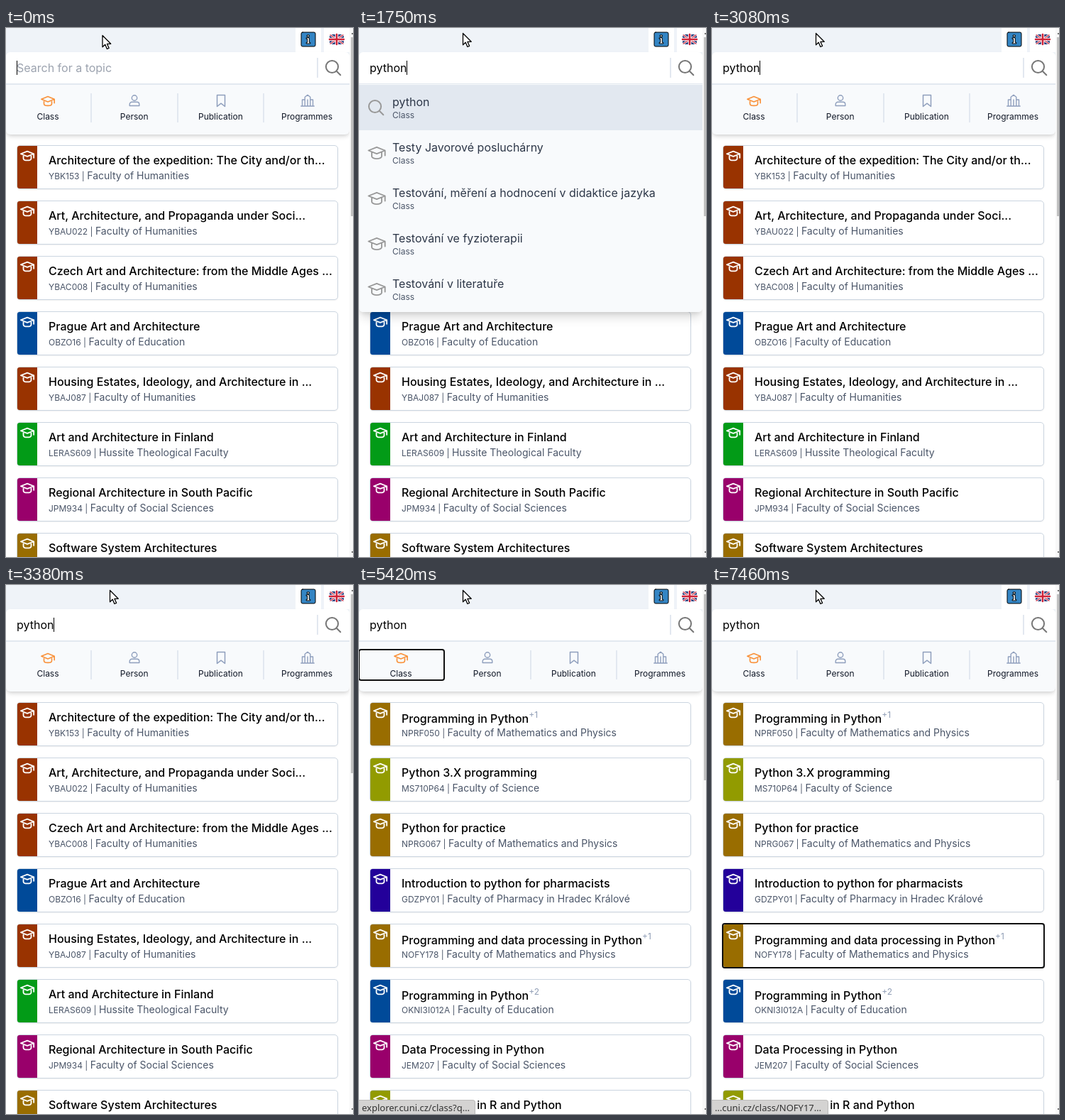
Write an HTML page that moves like this. It is 489 px wide and 745 px high and loops after 8000 ms.

```html
<!DOCTYPE html>
<html lang="en">
<head>
<meta charset="utf-8">
<title>Course search</title>
<style>
html, body { margin: 0; width: 100%; height: 100%; overflow: hidden; background: #fff; }
body { font-family: Inter, "Liberation Sans", sans-serif; }
#stage { position: relative; width: 489px; height: 745px; overflow: hidden; background: #fff; }
#stage div, #stage svg { position: absolute; box-sizing: border-box; white-space: pre; }
svg { fill: none; stroke: currentColor; stroke-linecap: round; stroke-linejoin: round; overflow: visible; }

.top { left: 0; top: 0; width: 484px; height: 50px; background: #eff3f8; }
.chip { top: 0; width: 36px; height: 34px; background: #fff; }
.head { left: 0; top: 34px; width: 484px; height: 116px; background: #f8fafc; border-radius: 6px;
  box-shadow: 0 4px 6px -1px rgba(0,0,0,.12), 0 2px 4px -1px rgba(0,0,0,.08); }
.field { left: 0; top: 0; width: 484px; height: 46px; background: #fff; border-bottom: 2px solid #e2e8f0; border-radius: 6px 6px 0 0; }
.bar { width: 2px; background: #e2e8f0; }
#query { left: 15px; top: 44px; line-height: 24px; font-size: 16px; }
#caret { top: 46px; width: 1px; height: 20px; background: #000; }
.tab { top: 117px; width: 122px; line-height: 16px; font-size: 12px; text-align: center; color: #111827; }

.card { left: 15px; width: 453px; height: 62px; background: #fff; border: 1px solid #cbd5e0; border-radius: 5px;
  box-shadow: 0 1px 2px rgba(0,0,0,.06); }
.strip { left: 0; top: 0; width: 28px; height: 60px; border-radius: 3px 0 0 3px; }
.strip svg { left: 3px; top: 3px; color: #fff; }
.name { left: 44px; top: 8px; line-height: 24px; font-size: 16px; font-weight: 500; color: #000; }
.name.up { top: 10px; }
.name span { position: relative; top: -7px; font-size: 12px; font-weight: 400; color: #8f9db5; }
.info { left: 44px; top: 32px; line-height: 20px; font-size: 14px; color: #4a5568; }
.info small { font-size: 12px; }

#menu { left: 0; top: 79px; width: 484px; height: 321px; background: #f8fafc; border-radius: 0 0 6px 6px; overflow: hidden; }
#menuBox { left: 0; top: 79px; width: 484px; height: 321px; border-radius: 0 0 6px 6px;
  box-shadow: 0 10px 15px -3px rgba(0,0,0,.14), 0 4px 6px -2px rgba(0,0,0,.1); }
.row { left: 0; width: 484px; height: 64px; }
.row:first-child { background: #e2e8f0; }
.row svg { color: #999; }
.hit { left: 47px; top: 12px; line-height: 24px; font-size: 16px; color: #2d3748; }
.kind { left: 47px; top: 35px; line-height: 16px; font-size: 12px; color: #4a5568; }

#ring { border: 2px solid #101010; border-radius: 4px; }
#status { left: 0; top: 725px; width: 164px; height: 21px; padding-left: 4px; background: #d4d3d2; border: solid #bcbbba;
  border-width: 1px 1px 0 0; border-radius: 0 4px 0 0; color: #333; font: 13px/21px "Noto Sans", sans-serif; }
.track { left: 484px; top: 0; width: 5px; height: 745px; background: #f8f8f8; }
#thumb { left: 486px; top: 13px; width: 3px; background: #c1c1c1; }
.nub { left: 487px; width: 2px; height: 2px; background: #777; }
</style>
</head>
<body>
<div id="stage"></div>
<script>
const LOOP = 8000;
const RUST = "#993300", BLUE = "#004a99", GREEN = "#029b17", PLUM = "#99006b",
      GOLD = "#996d00", OLIVE = "#929b00", INDIGO = "#23009a";
const HUM = "Faculty of Humanities", EDU = "Faculty of Education",
      SOC = "Faculty of Social Sciences", MATH = "Faculty of Mathematics and Physics";

// colour, title, code, faculty, extra count
const lists = [[
  [RUST, "Architecture of the expedition: The City and/or th...", "YBK153", HUM],
  [RUST, "Art, Architecture, and Propaganda under Soci...", "YBAU022", HUM],
  [RUST, "Czech Art and Architecture: from the Middle Ages ...", "YBAC008", HUM],
  [BLUE, "Prague Art and Architecture", "OBZO16", EDU],
  [RUST, "Housing Estates, Ideology, and Architecture in ...", "YBAJ087", HUM],
  [GREEN, "Art and Architecture in Finland", "LERAS609", "Hussite Theological Faculty"],
  [PLUM, "Regional Architecture in South Pacific", "JPM934", SOC],
  [GOLD, "Software System Architectures", "", ""]
], [
  [GOLD, "Programming in Python", "NPRF050", MATH, "+1"],
  [OLIVE, "Python 3.X programming", "MS710P64", "Faculty of Science"],
  [GOLD, "Python for practice", "NPRG067", MATH],
  [INDIGO, "Introduction to python for pharmacists", "GDZPY01", "Faculty of Pharmacy in Hradec Králové"],
  [GOLD, "Programming and data processing in Python", "NOFY178", MATH, "+1"],
  [BLUE, "Programming in Python", "OKNI3I012A", EDU, "+2"],
  [PLUM, "Data Processing in Python", "JEM207", SOC],
  [OLIVE, "Data analysis in R and Python", "", ""]
]];

const hits = [
  ["python", "Testy Javorové posluchárny", "Testování, měření a hodnocení v didaktice jazyka",
   "Testování ve fyzioterapii", "Testování v literatuře"],
  ["python", "Programování v Pythonu", "Úvod do programování v jazyce Python pro farmaceuty",
   "Zpracování dat v jazyce Python", "Analýza dat v R a Pythonu"]
];

const tabRing = i => [[-1, 90, 122, 45], [120, 90, 122, 45], [241, 90, 123, 45], [362, 90, 122, 45]][i];
const cardRing = i => [14, 164 + 78 * i, 455, 64];
const link = code => "…cuni.cz/class/" + code + "…";

// step tables: [start ms, value]
const tracks = {
  pointer: [[0, [136, 10.5]], [40, [138, 10]], [110, [141, 9]], [180, [144, 8]], [250, [146.5, 7.5]]],
  caret: [[0, 1], [420, 0], [1000, 1], [2420, 0], [3000, 1], [3750, 0], [4210, 1], [4630, 0]],
  query: [[0, ""], [1750, "python"]],
  menu: [[0, -1], [1750, 0], [2460, 1], [3080, -1]],
  list: [[0, 0], [3710, 1]],
  ring: [[0, null], [4630, [444, 40, 34, 32]], [5420, tabRing(0)], [5580, tabRing(1)], [5880, tabRing(2)],
    [6290, tabRing(3)], [6540, cardRing(0)], [7000, cardRing(1)], [7170, cardRing(2)],
    [7290, cardRing(3)], [7460, cardRing(4)]],
  status: [[0, ""], [4790, "explorer.cuni.cz/class?q…"], [5580, "explorer.cuni.cz/person?…"],
    [5920, "explorer.cuni.cz/publicat…"], [6290, "…cuni.cz/programme?q…"], [6580, link("NPRF05")],
    [7000, link("MS710P")], [7170, link("NPRG06")], [7290, link("GDZPY0")], [7460, link("NOFY17")]],
  statusFade: [[0, 0], [4790, 0.5], [4960, 1]]
};

const svg = (x, y, w, box, body, width, color = "") =>
  `<svg style="left:${x}px;top:${y}px${color && ";color:" + color}" width="${w}" height="${w}" viewBox="0 0 ${box} ${box}" stroke-width="${width}">${body}</svg>`;
const cap = (x, y, w, width, color) =>
  svg(x, y, w, 24, '<path d="M22 9L12 5 2 9l10 4 10-4v6M6 10.6V16a6 3 0 0 0 12 0v-5.4"/>', width, color);
const lens = (x, y, color) =>
  svg(x, y, 24, 24, '<circle cx="10.5" cy="10.5" r="8.6"/><path d="M16.8 16.8L22.3 22.3"/>', 2, color);
const bar = (x, y, h) => `<div class="bar" style="left:${x}px;top:${y}px;height:${h}px"></div>`;

const card = ([color, name, code, faculty, extra], i) =>
  `<div class="card" style="top:${165 + 78 * i}px"><div class="strip" style="background:${color}">${cap(3, 3, 22, 2)}</div>` +
  `<div class="name${extra ? " up" : ""}">${name}${extra ? `<span>${extra}</span>` : ""}</div>` +
  `<div class="info"><small>${code} | </small>${faculty}</div></div>`;
const row = (name, i) =>
  `<div class="row" style="top:${1 + 64 * i}px">${i ? cap(11, 18, 28, 1.6) : lens(12, 20)}` +
  `<div class="hit">${name}</div><div class="kind">Class</div></div>`;

const GREY = "#8f9fbd";
const person = '<circle cx="10" cy="5.5" r="3.7"/><path d="M3.2 16.5v-2a3.2 3.2 0 0 1 3.2-3.2h7.2a3.2 3.2 0 0 1 3.2 3.2v2z"/>';
const bookmark = '<path d="M4.5 1.5h11v16L10 13.2l-5.500 4.300z"/>';
const hall = '<path d="M.8 17h18.400M6.200 17V4.200L10 1.200l3.800 3V17M2.500 17V8h3.700M13.800 8h3.700v9M10 8v9"/>';
const flag = `<svg style="left:456px;top:9px" width="20" height="14" viewBox="0 0 20 14" stroke-linecap="butt">
  <rect width="20" height="14" rx="1.5" fill="#223b7c" stroke="none"/>
  <path d="M1 .7L19 13.300M19 .7L1 13.300" stroke="#fff" stroke-width="2.800"/>
  <path d="M1 .7L19 13.300M19 .7L1 13.300" stroke="#cf2338" stroke-width="1.100"/>
  <path d="M10 0v14M0 7h20" stroke="#fff" stroke-width="4.600"/>
  <path d="M10 0v14M0 7h20" stroke="#cf2338" stroke-width="2.600"/></svg>`;
const infoBadge = `<svg style="left:416px;top:6px" width="20" height="20" stroke="none">
  <rect width="20" height="20" rx="2" fill="#3485c4"/>
  <path fill="#fff" d="M8.600 4h2.700v2.300H8.600zM7.500 7.800h3.800v6.600h1.500V16H7.200v-1.600h1.500V9.300H7.500z"/></svg>`;

document.getElementById("stage").innerHTML = `
  <div id="cards"></div>
  <div class="top"></div>
  <div class="chip" style="left:408px"></div><div class="chip" style="left:448px"></div>
  ${infoBadge}${flag}
  <div class="head"><div class="field"></div></div>
  ${bar(438, 42, 28)}${lens(449, 44, "#777")}
  ${[119, 241, 362].map(x => bar(x, 92, 41)).join("")}
  ${cap(48, 92, 22, 1.8, "#f9923b")}
  ${svg(170.5, 93, 20, 20, person, 1.4, GREY)}
  ${svg(292.5, 93, 20, 20, bookmark, 1.5, GREY)}
  ${svg(414.500, 93, 20, 20, hall, 1.4, GREY)}
  ${["Class", "Person", "Publication", "Programmes"].map((s, i) =>
    `<div class="tab" style="left:${-2 + 121.7 * i}px">${s}</div>`).join("")}
  <div id="query"></div>
  <div id="menuBox"></div><div id="menu"></div>
  <div id="caret"></div>
  <div id="ring"></div>
  <div class="track"></div><div id="thumb"></div>
  <div class="nub" style="top:7px"></div><div class="nub" style="top:737px"></div>
  <div id="status"></div>
  <svg id="pointer" style="left:0;top:0" width="14" height="22" stroke="#000" stroke-width="1.300">
    <path fill="#fff" d="M0 0v16.300l3.700-3.500 2.700 6.200 2.700-1.200-2.700-6h5.300z"/></svg>`;

const $ = id => document.getElementById(id);
const show = (el, on) => { el.style.visibility = on ? "visible" : "hidden"; };

const apply = {
  pointer([x, y]) { $("pointer").style.transform = `translate(${x}px,${y}px)`; },
  caret(on) { show($("caret"), on); },
  query(text) {
    $("query").textContent = text || "Search for a topic";
    $("query").style.color = text ? "#000" : "#9ca3af";
    $("caret").style.left = (text ? 67 : 15) + "px";
  },
  menu(n) {
    show($("menu"), n >= 0);
    show($("menuBox"), n >= 0);
    if (n >= 0) $("menu").innerHTML = hits[n].map(row).join("");
  },
  list(n) {
    $("cards").innerHTML = lists[n].map(card).join("");
    $("thumb").style.height = (n ? 262 : 252) + "px";
  },
  ring(box) {
    show($("ring"), box);
    if (box) ["left", "top", "width", "height"].forEach((k, i) => { $("ring").style[k] = box[i] + "px"; });
  },
  status(text) { $("status").textContent = text; },
  statusFade(a) { $("status").style.opacity = a; }
};

const stepAt = (table, t) => table.reduce((found, s, i) => s[0] <= t ? i : found, 0);
const current = {};

function draw(t) {
  for (const key in tracks) {
    const i = stepAt(tracks[key], t);
    if (current[key] === i) continue;
    current[key] = i;
    apply[key](tracks[key][i][1]);
  }
}

const start = performance.now();
function tick() {
  draw((performance.now() - start) % LOOP);
  requestAnimationFrame(tick);
}
tick();
</script>
</body>
</html>
```
